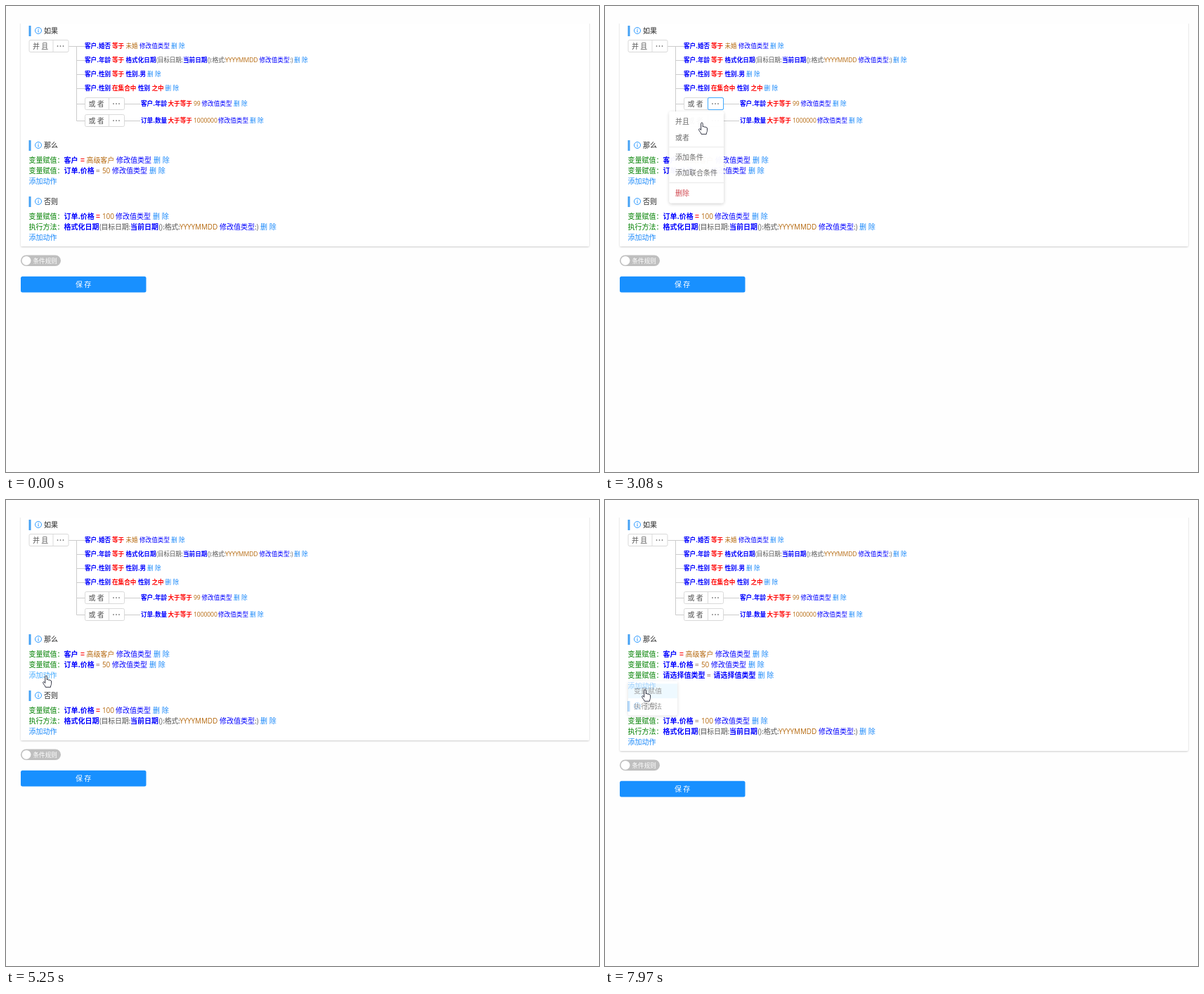
Recreate the animation shown at these times as an HTML page. Size 844 px wide and 663 px high, loop 8 s.

```html
<!DOCTYPE html>
<html lang="zh-CN">
<head>
<meta charset="utf-8">
<title>规则编辑器</title>
<style>
html, body { margin: 0; width: 100%; height: 100%; overflow: hidden; background: #fefefe; }
svg { display: block; width: 844px; height: 663px; font-family: 'Noto Sans CJK SC', 'Noto Sans CJK', 'Noto Sans', sans-serif; }
.key { fill: #00f; font-weight: 700; }
.op { fill: #f00; font-weight: 700; }
.eq { fill: #80604e; font-weight: 500; }
.val { fill: #b5690f; font-family: 'Open Sans', 'Noto Sans CJK SC', 'Noto Sans CJK', sans-serif; letter-spacing: -.1px; }
.type { fill: #00f; }
.link { fill: #1888fa; word-spacing: .5px; }
.hover { fill: #40a9ff; }
.arg { fill: #555; letter-spacing: -.3px; }
.act { fill: #008000; }
.btn { fill: #555; }
.head { fill: #222; font-weight: 500; }
.inv { fill: #fff; font-weight: 500; }
.item { fill: #666; }
.danger { fill: #cf3f47; }
.box { fill: #fff; stroke: #d9d9d9; }
.wire { fill: none; stroke: #ccc; }
.pointer { fill: #fff; stroke: #1c2030; stroke-width: .9; stroke-linejoin: round; }
</style>
</head>
<body>
<svg id="stage" viewBox="0 0 844 663" xmlns="http://www.w3.org/2000/svg"></svg>
<script>
const SMALL = 8.6, BASE = 10;

// One line of text: runs are [x, class, text], y is the visual middle.
const row = (y, size, ...runs) => runs.map(([x, cls, text]) =>
  `<text x="${x}" y="${y + size * 0.38}" font-size="${size}" class="${cls}">${text}</text>`).join('');
const change = x => [x, 'type', '修改值类型'];
const remove = x => [x, 'link', '删 除'];
const assign = [32.5, 'act', '变量赋值：'];

const title = (y, text) => `
  <rect x="32.5" y="${y - 7}" width="3" height="15" fill="#46a2f5"/>
  <circle cx="46" cy="${y}" r="4.5" fill="none" stroke="#1890ff" stroke-width=".9"/>
  <path d="M46 ${y - 2.6}v1.2M46 ${y - 0.6}v3.2" stroke="#1890ff"/>
  ${row(y, BASE, [54, 'head', text])}`;

const dots = (x, y) => [-4, 0, 4].map(d =>
  `<circle cx="${x + d}" cy="${y}" r=".85" fill="#555"/>`).join('');

const group = (x, y, text) => `
  <rect class="box" x="${x + .5}" y="${y - 8.5}" width="56" height="17" rx="2"/>
  <path d="M${x + 34.5} ${y - 8.5}v17" stroke="#d9d9d9"/>
  ${row(y, BASE, [x + 5.5, 'btn', text])}${dots(x + 45, y)}`;

const menu = (id, w, h, body) => `
  <g id="${id}"><rect width="${w}" height="${h}" rx="2.5" fill="#fff" filter="url(#float)"/>${body}</g>`;
const rule = y => `<path d="M0 ${y}h77.5" stroke="#e8e8e8"/>`;

const stage = document.getElementById('stage');
stage.innerHTML = `
<defs>
  <filter id="lift" x="-5%" y="-5%" width="110%" height="110%">
    <feDropShadow dx="0" dy="1" stdDeviation="1.3" flood-color="#000" flood-opacity=".2"/>
  </filter>
  <filter id="float" x="-20%" y="-20%" width="140%" height="140%">
    <feDropShadow dx="0" dy="1.5" stdDeviation="2.5" flood-color="#000" flood-opacity=".2"/>
  </filter>
  <clipPath id="below"><rect y="25" width="844" height="638"/></clipPath>
</defs>
<g clip-path="url(#below)">
  <rect id="card" x="21" y="18" width="809" height="324" rx="2" fill="#fff" filter="url(#lift)"/>
</g>
${title(35, '如果')}
<path class="wire" d="M89 57.5H112M100.5 57V163.5H112M100 77.5H112M100 97.5H112M100 117.5H112M100 139.5H112M169 139.5H191M169 163.5H191"/>
${group(32.5, 57, '并 且')}${group(112, 139, '或 者')}${group(112, 163, '或 者')}
<rect id="active" x="146.5" y="130.5" width="22" height="17" rx="1.5" fill="none" stroke="#40a9ff"/>
${row(57, SMALL, [112, 'key', '客户.婚否'], [151, 'op', '等于'], [170.5, 'val', '未婚'], change(190), remove(235))}
${row(77, SMALL, [112, 'key', '客户.年龄'], [151, 'op', '等于'], [170.5, 'key', '格式化日期'],
  [213.5, 'arg', '(目标日期:'], [252, 'key', '当前日期'], [286.5, 'arg', '():格式:'],
  [312, 'val', 'YYYYMMDD'], change(360.5), [404, 'arg', ':)'], remove(410))}
${row(97, SMALL, [112, 'key', '客户.性别'], [151, 'op', '等于'], [170.5, 'key', '性别.男'], remove(201))}
${row(117, SMALL, [112, 'key', '客户.性别'], [151, 'op', '在集合中'], [188, 'key', '性别'], [207.5, 'op', '之中'], remove(226.5))}
${row(139, SMALL, [192, 'key', '客户.年龄'], [230.5, 'op', '大于等于'], [267, 'val', '99'], change(278.5), remove(324))}
${row(163, SMALL, [192, 'key', '订单.数量'], [230.5, 'op', '大于等于'], [267, 'val', '1000000'], change(302), remove(347))}
${title(198, '那么')}
${row(219, BASE, assign, [82.5, 'key', '客户'], [106, 'op', '='], [114.5, 'val', '高级客户'], change(157), remove(210))}
${row(234, BASE, assign, [82.5, 'key', '订单.价格'], [128, 'eq', '='], [137, 'val', '50'], change(151), remove(204))}
<g id="pick">${row(249, BASE, [32.5, 'act', '请选择动作类型'], remove(105.5))}</g>
<g id="filled">${row(249, BASE, assign, [82.5, 'key', '请选择值类型'], [145, 'eq', '='],
  [154.5, 'key', '请选择值类型'], remove(217.5))}</g>
<g id="rest">
  <g id="add">${row(249, BASE, [32.5, 'link', '添加动作'])}</g>
  ${title(278, '否则')}
  ${row(299, BASE, assign, [82.5, 'key', '订单.价格'], [128, 'op', '='], [137, 'val', '100'], change(156), remove(209))}
  ${row(314, BASE, [32.5, 'act', '执行方法：'], [82.5, 'key', '格式化日期'], [132.5, 'arg', '(目标日期:'],
    [177, 'key', '当前日期'], [217, 'arg', '():格式:'], [247, 'val', 'YYYYMMDD'], change(304),
    [354, 'arg', ':)'], remove(362))}
  ${row(329, BASE, [32.5, 'link', '添加动作'])}
  <rect x="21" y="354.5" width="57" height="15.5" rx="7.75" fill="#bfbfbf"/>
  <circle cx="29" cy="362.3" r="6.4" fill="#fff"/>
  ${row(362.5, SMALL, [38.5, 'inv', '条件规则'])}
  <rect x="21" y="384.7" width="178.5" height="22.9" rx="2.5" fill="#1890ff"/>
  ${row(396.5, BASE, [99, 'inv', '保 存'])}
</g>
${menu('logic', 77.5, 131, rule(51) + rule(102) +
  [['并且', 14], ['或者', 37], ['添加条件', 65.5], ['添加联合条件', 88]].map(([s, y]) =>
    row(y, BASE, [8.5, 'item', s])).join('') + row(116.5, BASE, [8.5, 'danger', '删除']))}
${menu('kind', 70, 51, `<rect id="glow" y="3.5" width="70" height="22" fill="#e6f7ff"/>` +
  row(14.5, BASE, [8, 'item', '变量赋值']) + row(37, BASE, [8, 'item', '执行方法']))}
<path id="arrow" class="pointer" d="M0 0V11.3L2.6 8.9L4.4 13.1L6.1 12.3L4.4 8.3H8Z"/>
<path id="hand" class="pointer" d="M-1.3 1.2C-1.3-.4 1.3-.4 1.3 1.2V6C1.5 5 3.5 5 3.6 6.4C4 5.5 5.6 5.6 5.7 7
  C6.2 6.4 7.6 6.6 7.6 8V11.5C7.6 13 6.4 14 6.4 16.3H-.8C-1 14.5-3 13-4.2 10.5C-5 9-3.4 8-2.4 9.2L-1.3 10.5Z"/>`;

const el = {};
stage.querySelectorAll('[id]').forEach(n => el[n.id] = n);
const addText = el.add.firstElementChild;
const equals = el.rest.querySelector('.op');

// Pointer tip: [ms, x, y]
const path = [
  [230, 752, 648], [600, 390, 345], [1000, 165, 172], [1230, 68, 142], [1400, 65, 131],
  [1690, 106, 177], [1840, 106, 178], [1920, 106, 180], [2150, 108, 177], [2800, 156, 138],
  [2920, 156, 138], [3080, 138, 166], [3400, 95, 178], [3780, 59, 198], [4010, 61, 233],
  [4180, 61, 236], [4330, 61, 235], [4500, 61, 235], [4720, 58, 245], [4950, 58, 246],
  [5250, 57, 250], [6700, 57, 250], [6730, 52, 241], [6900, 53, 243], [7130, 55, 246],
  [7360, 57, 256], [7430, 57, 262], [7600, 57, 270]
];

const clamp = v => Math.max(0, Math.min(1, v));
const ramp = (t, from, to) => clamp((t - from) / (to - from));
const show = (node, on) => node.setAttribute('display', on ? 'inline' : 'none');

function tipAt(t) {
  const i = path.findIndex(k => k[0] > t);
  if (i < 0) return path[path.length - 1].slice(1);
  if (i === 0) return path[0].slice(1);
  const [t0, x0, y0] = path[i - 1], [t1, x1, y1] = path[i];
  const f = ramp(t, t0, t1);
  return [x0 + (x1 - x0) * f, y0 + (y1 - y0) * f];
}

function setMenu(node, x, y, t, open, close) {
  const enter = 1 - (1 - ramp(t, open, open + 180)) ** 3;
  const leave = ramp(t, close, close + 200);
  const k = enter * (1 - leave);
  show(node, k > 0);
  node.setAttribute('opacity', k);
  node.setAttribute('transform', `translate(${x} ${y}) scale(1 ${0.85 + 0.15 * k})`);
}

function draw(t) {
  const added = t >= 5650, chosen = t >= 7800;
  const shift = added ? 15 : 0;
  el.rest.setAttribute('transform', `translate(0 ${shift})`);
  el.card.setAttribute('height', 324 + shift);
  equals.setAttribute('class', added ? 'eq' : 'op');
  addText.setAttribute('class', t >= 4600 && !added ? 'hover' : 'link');
  show(el.pick, added && !chosen);
  show(el.filled, chosen);
  show(el.active, t >= 2760 && t < 3560);
  show(el.glow, t >= 7500);
  setMenu(el.logic, 91.5, 150, t, 2960, 3500);
  setMenu(el.kind, 33, 258, t, 6900, 7900);

  const [x, y] = tipAt(t);
  const pointing = (t >= 2760 && t < 3420) || t >= 3880;
  for (const node of [el.arrow, el.hand]) node.setAttribute('transform', `translate(${x} ${y})`);
  show(el.arrow, t >= 230 && !pointing);
  show(el.hand, pointing);
}

const start = performance.now();
function tick() {
  draw((performance.now() - start) % 8000);
  requestAnimationFrame(tick);
}
tick();
</script>
</body>
</html>
```
